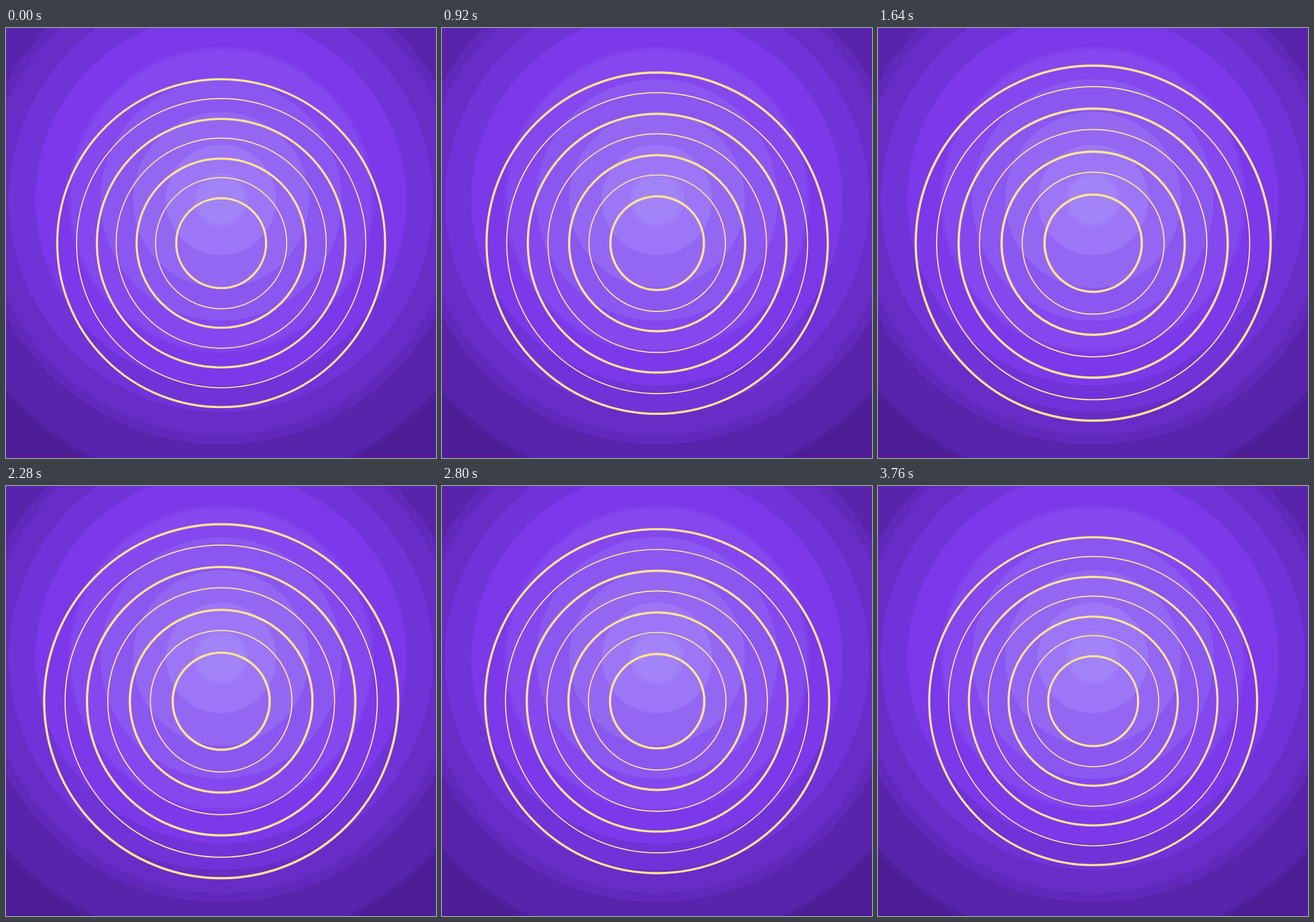
An HTML page with a canvas that plays this animation: 748 px wide and 748 px high, repeating every 3.84 s.

```html
<!DOCTYPE html>
<html lang="en">
<head>
<meta charset="utf-8">
<title>Breathing rings</title>
<style>
  html, body { margin: 0; width: 100%; height: 100%; overflow: hidden; background: #4d1d95; }
  canvas { display: block; }
</style>
</head>
<body>
<canvas id="stage" width="748" height="748"></canvas>
<script>
const SIZE = 748, LOOP = 3840, STEP = 40;
const ctx = document.getElementById("stage").getContext("2d");

// Background discs, outermost first: radius, colour
const bands = [
  [507, "#501f9c"], [499, "#5824ab"], [425, "#6129bb"], [409, "#672dc6"],
  [369, "#7033d7"], [323, "#7b39e9"], [266, "#8041ec"], [261, "#8448ee"],
  [210, "#8b57f1"], [153, "#9467f3"], [96, "#9c76f6"], [47, "#a07ef7"],
  [41, "#a283f8"]
];

function disc(radius, color) {
  ctx.fillStyle = color;
  ctx.beginPath();
  ctx.arc(374, 299, radius, 0, Math.PI * 2);
  ctx.fill();
}

function ring(radius, width, scale) {
  ctx.lineWidth = width * scale;
  ctx.beginPath();
  ctx.arc(374.3, 374.3, radius * scale, 0, Math.PI * 2);
  ctx.stroke();
}

// Sine breathing between 92% and 100%, resting near both extremes
function ringScale(time) {
  const tick = Math.floor(time / STEP) * STEP;
  let t = Math.min(tick, LOOP - tick);
  if (t < 120) t = 0;
  else if (t > 1760 && t < 1920) t = 1760;
  return 0.96 - 0.04 * Math.cos(t / LOOP * Math.PI * 2);
}

function draw(time) {
  ctx.fillStyle = "#4d1d95";
  ctx.fillRect(0, 0, SIZE, SIZE);
  for (const [radius, color] of bands) disc(radius, color);

  const scale = ringScale(time);
  ctx.strokeStyle = "#fee594";
  for (let i = 0; i < 4; i++) ring(85 + 75 * i, 4, scale);
  for (let i = 0; i < 3; i++) ring(124 + 74.7 * i, 2, scale);
}

let start;
function loop(now) {
  start ??= now;
  draw(Math.max(0, now - start) % LOOP);
  requestAnimationFrame(loop);
}
draw(0);
requestAnimationFrame(loop);
</script>
</body>
</html>
```
